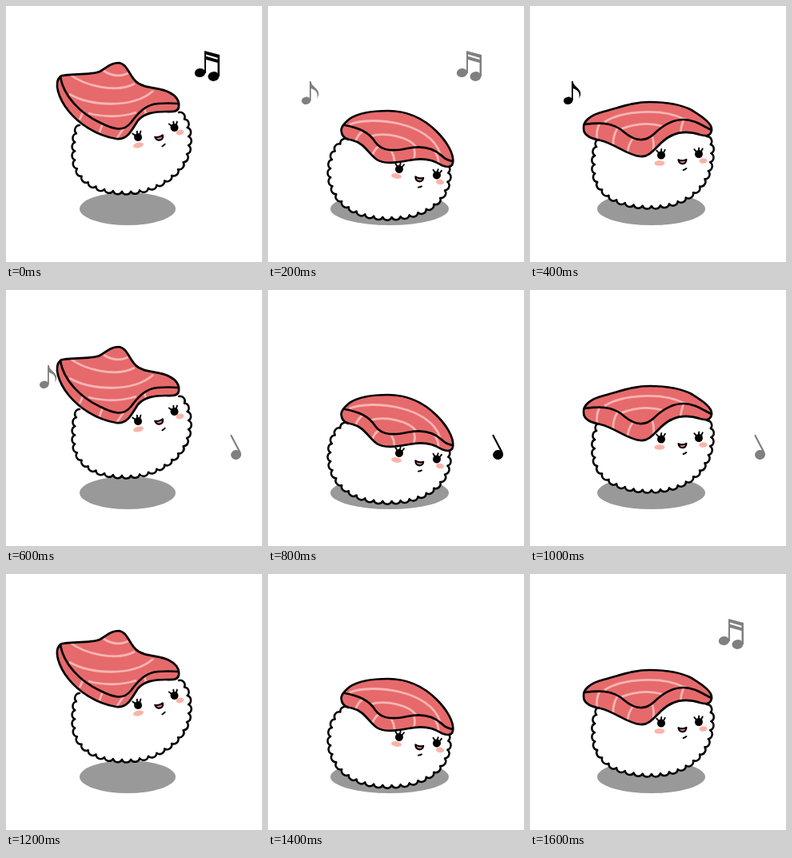
An HTML page for the animation above (1800 ms loop, 320 px wide and 320 px high).

```html
<!DOCTYPE html>
<html lang="en">
<head>
<meta charset="utf-8">
<title>Dancing sushi</title>
<style>
  html, body { margin: 0; width: 100%; height: 100%; overflow: hidden; background: #fff; }
  svg { display: block; width: 100%; height: 100%; }
  .line { fill: none; stroke: #000; stroke-width: 2.7; stroke-linecap: round; stroke-linejoin: round; }
  .rice { fill: #fff; stroke-width: 2.5; }
  .fish { fill: #e66a6b; }
  .fat { fill: none; stroke: #f8b4b3; stroke-width: 2.8; }
  .thin { stroke-width: 1.9; }
  .mouth { fill: #f47c78; stroke-width: 2.1; }
  .blush { fill: #fcb3a8; }
</style>
</head>
<body>
<svg id="stage" viewBox="0 0 320 320" xmlns="http://www.w3.org/2000/svg"></svg>
<script>
const STEP = 200, STEPS = 9, BUMP = 11;
const stage = document.getElementById('stage');

const poses = [
  { // up
    shadow: [152, 60], tilt: -13,
    rice: 'M92 149C84 165 87 175 86 186C85 212 105 232 150 232C190 232 228 205 228 172C229 155 225 140 216 133',
    fish: 'M68 88C74 84 105 87 117 82C126 77 131 71 141 71C151 72 154 86 162 94C172 104 192 101 204 108C212 112 217 117 216 126C215 133 208 132 200 132C185 132 173 134 165 143C157 155 152 168 138 166C112 162 90 146 78 131C66 116 59 96 68 88Z',
    ridge: 'M68 89C72 112 92 134 118 146C136 155 147 157 156 146C164 135 174 123 190 122Q203 121 216 122',
    fat: 'M122 81Q137 91 153 84M79 85C97 99 137 110 161 97M79 110C105 125 158 129 184 106M103 134Q135 142 163 133M97 131L92 142M121 147L116 160M147 153L138 166M173 129L176 138',
    eyes: [[165, 164], [210.5, 152]], blush: [[165.5, 174], [217.5, 158]],
    mouth: [191.5, 164.5], chin: [197, 174]
  },
  { // down
    shadow: [152, 74], tilt: 9,
    rice: 'M100 167C84 172 79 190 78 206C77 245 110 264 150 264C194 264 225 244 225 212Q226 205 222 198',
    fish: 'M92 158C90 152 95 147 102 141C114 133 134 131 150 131C178 131 198 144 211 157C222 168 233 184 231 196C230 202 224 202 217 199C205 191 190 190 176 193C160 196 145 198 136 192C126 185 120 171 106 168C97 166 93 164 92 158Z',
    ridge: 'M96 149C112 152 126 157 134 170C143 183 160 181 174 178C192 174 207 178 217 187Q223 193 231 194',
    fat: 'M102 148C130 137 202 145 215 184M127 163C148 157 177 164 186 177M119 156Q112 161 109 170M139 175Q132 180 130 188M153 180Q158 186 158 196M182 177Q185 184 182 192M207 180Q214 188 213 199',
    eyes: [[164, 204], [211, 211.5]], blush: [[160.5, 212.5], [215, 220]],
    mouth: [189, 216], chin: [190, 226]
  },
  { // middle
    shadow: [151.5, 67.5], tilt: -2,
    rice: 'M88 166C80 178 81 190 81 204C81 235 112 250 150 250C192 250 221 228 225 196C227 182 228 172 221 163',
    fish: 'M67 153C66 144 76 136 92 132C112 127 128 120 150 120C172 120 190 124 202 130C213 137 228 146 227 155C226 163 220 163 213 161C192 154 176 159 164 171C154 181 148 189 138 188C122 187 106 172 88 168C78 166 67 163 67 153Z',
    ridge: 'M68 148C84 146 103 144 118 158C130 168 143 171 155 160C166 149 177 142 192 142C206 142 216 150 227 155',
    fat: 'M93 145C115 131 165 127 194 142M113 154Q140 143 165 150M87 147Q82 156 84 168M110 152Q103 162 104 176M129 165Q122 174 122 185M152 162Q156 170 154 181M192 142Q189 150 188 159',
    eyes: [[164, 186.5], [211, 185]], blush: [[162, 196.5], [216.5, 193.5]],
    mouth: [190.5, 194], chin: [193.5, 204]
  }
];

// Each note shows for three steps: grey, black, grey.
const notes = [
  { from: 8, art: ball(242.5, 83.5, 6.7, 5.5) + ball(259.5, 88, 7, 5.9) +
    '<path d="M248 56L267 61V88H264.500V71L250 67V84H248ZM250 60.500V62.800L264.500 67V64.700Z" fill-rule="evenodd"/>' },
  { from: 1, art: ball(47.7, 118.3, 5.8, 4.7) +
    '<path d="M52 94H53.800C54 102 69 104 61 116C64 107 57 104 53.800 103V118H52Z"/>' },
  { from: 3, art: ball(287.6, 206, 6.5, 6) +
    '<path d="M281.500 182L292.500 203" stroke="currentColor" stroke-width="2.200" stroke-linecap="round"/>' }
];

function ball(x, y, rx, ry) {
  return `<ellipse cx="${x}" cy="${y}" rx="${rx}" ry="${ry}" transform="rotate(-8 ${x} ${y})"/>`;
}

function make(tag) {
  return document.createElementNS('http://www.w3.org/2000/svg', tag);
}

// Evenly spaced round bumps along a path
function bumps(d) {
  const path = make('path');
  path.setAttribute('d', d);
  const length = path.getTotalLength(), count = Math.round(length / BUMP);
  const r = 0.54 * length / count;
  let out = '';
  for (let i = 0; i <= count; i++) {
    const { x, y } = path.getPointAtLength(length * i / count);
    out += (i ? `A${r} ${r} 0 0 0 ` : 'M') + `${x} ${y}`;
  }
  return out;
}

const place = ([x, y], tilt, art) => `<g transform="translate(${x} ${y}) rotate(${tilt})">${art}</g>`;

const eye = '<circle r="5"/><path class="line thin" d="M-3 -3L-5.500 -6M0 -4L.5 -7.500M3 -3L5 -6.500"/>';
const blush = far => `<ellipse class="blush" rx="${far ? 5 : 6.5}" ry="3.300"/>`;
const mouth = '<path class="line mouth" d="M-5 -2Q0 .5 5 -2C5 5 -4 5 -5 -2Z"/>';
const chin = '<path class="line thin" d="M-2 .8Q0 .6 2 -.8"/>';

function sushi(p, i) {
  return `<clipPath id="cut${i}"><path d="${p.fish}"/></clipPath>
    <path class="line rice" d="${bumps(p.rice)}"/>
    <path class="fish" d="${p.fish}"/>
    <path class="fat" clip-path="url(#cut${i})" d="${p.fat}"/>
    <path class="line" d="${p.ridge}"/>
    <path class="line" d="${p.fish}"/>` +
    p.blush.map((b, far) => place(b, p.tilt, blush(far))).join('') +
    p.eyes.map(e => place(e, p.tilt, eye)).join('') +
    place(p.mouth, p.tilt, mouth) + place(p.chin, p.tilt - 4, chin);
}

function layer(art) {
  const g = make('g');
  g.innerHTML = art;
  return stage.appendChild(g);
}

const shadows = poses.map(({ shadow: [x, rx] }) =>
  layer(`<ellipse cx="${x}" cy="253.500" rx="${rx}" ry="20.500" fill="#999"/>`));
const noteLayers = notes.map(n => layer(n.art));
const bodies = poses.map((p, i) => layer(sushi(p, i)));

const show = (el, on) => { el.style.display = on ? '' : 'none'; };

function draw(step) {
  poses.forEach((_, i) => {
    show(shadows[i], i === step % 3);
    show(bodies[i], i === step % 3);
  });
  notes.forEach((n, i) => {
    const age = (step - n.from + STEPS) % STEPS, g = noteLayers[i];
    show(g, age < 3);
    g.style.color = g.style.fill = age === 1 ? '#000' : '#808080';
  });
}

const start = performance.now();
let last = 0;
function tick() {
  const step = Math.floor((performance.now() - start) / STEP) % STEPS;
  if (step !== last) draw(last = step);
  requestAnimationFrame(tick);
}
draw(0);
tick();
</script>
</body>
</html>
```
